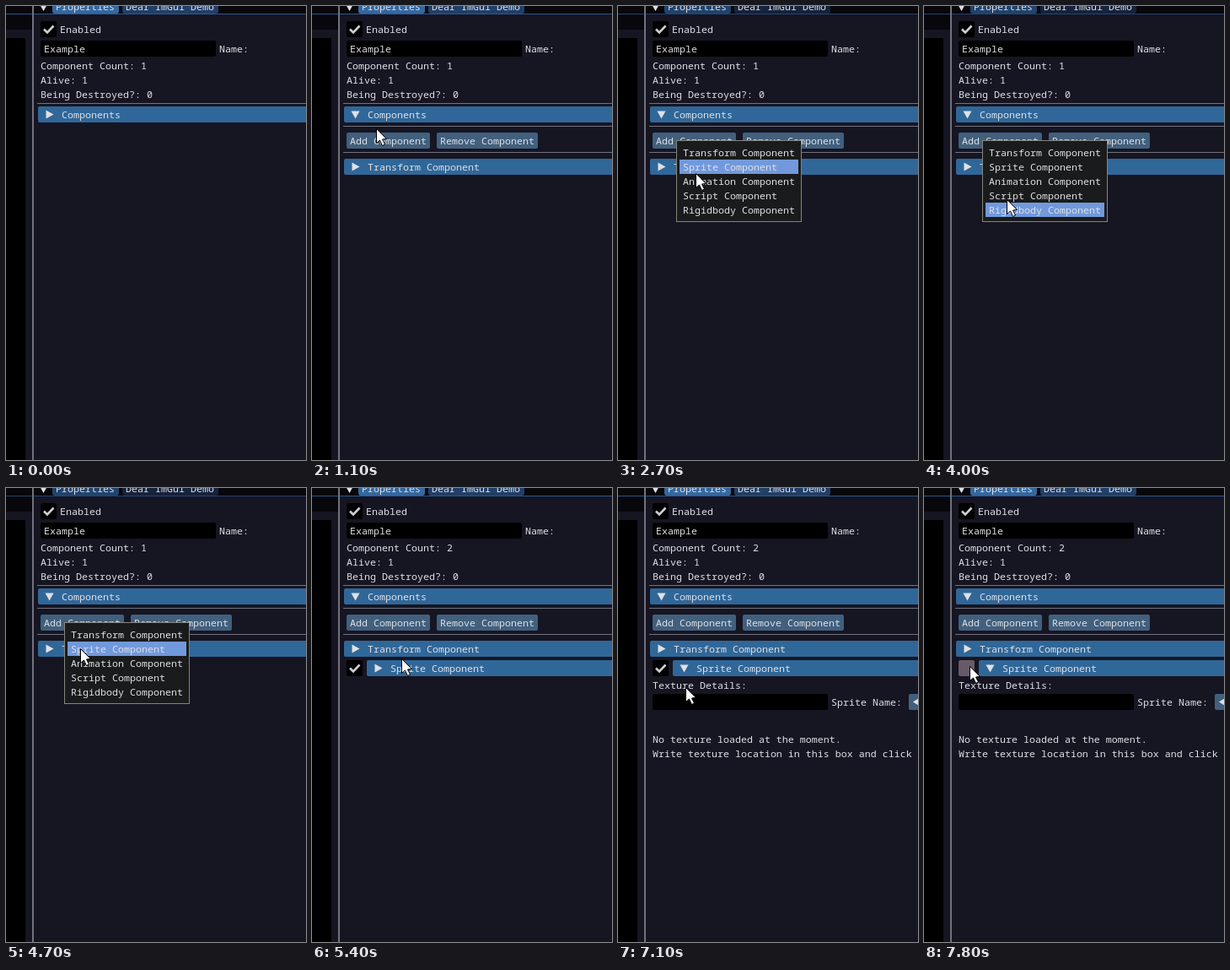
These frames come from a looping animation (356x538 px, 8 s). An HTML page with a canvas:

```html
<!DOCTYPE html>
<html>
<head>
<meta charset="utf-8">
<style>
html, body { margin: 0; width: 100%; height: 100%; overflow: hidden; background: #161522; }
canvas { display: block; }
</style>
</head>
<body>
<canvas id="stage" width="356" height="538"></canvas>
<script>
const ctx = document.getElementById('stage').getContext('2d');
const LOOP = 8000, STEP = 100;
const BG = '#161522', TEXT = '#e0e0e4', HEADER = '#306799', HEADER_HOT = '#4282bd',
      BUTTON = '#41607e', BUTTON_HOT = '#5680b4', LINE = '#72717d', BAR = '#07070c';
const ROW = 17, FRAME = 19, LEFT = 41;
const MENU = ['Transform', 'Sprite', 'Animation', 'Script', 'Rigidbody'];
const OPEN = 1000, MENU_IN = 1600, ADD = 5000, EXPAND = 5900, UNCHECK = 7700;

// Where the pointer comes to rest: time, x, y
const STOPS = [
  [400, -20, 8], [900, 86, 129], [1500, 68, 158], [2200, 68, 158],
  [2700, 92, 198], [3900, 100, 238], [4900, 88, 188], [5400, 106, 202],
  [5900, 88, 213], [6300, 97, 241], [6800, 108, 262], [7800, 54, 211]
];

function pointer(t) {
  t = Math.min(Math.max(t, STOPS[0][0]), STOPS.at(-1)[0]);
  const i = Math.max(1, STOPS.findIndex(s => s[0] >= t));
  const [t0, x0, y0] = STOPS[i - 1], [t1, x1, y1] = STOPS[i];
  const k = (t - t0) / (t1 - t0), ease = k * (2 - k);
  return [Math.round(x0 + (x1 - x0) * ease), Math.round(y0 + (y1 - y0) * ease)];
}

function box(x, y, w, h, color, r = 0) {
  ctx.fillStyle = color;
  ctx.beginPath();
  ctx.roundRect(x, y, w, h, r);
  ctx.fill();
}

function poly(points, color) {
  ctx.fillStyle = color;
  ctx.beginPath();
  points.forEach(([x, y]) => ctx.lineTo(x, y));
  ctx.closePath();
  ctx.fill();
}

// y is the baseline
function label(s, x, y) {
  ctx.fillStyle = TEXT;
  ctx.fillText(s, x, y);
}

function arrow(x, y, open) {
  poly(open ? [[x - 5, y - 4], [x + 5, y - 4], [x, y + 5]]
            : [[x - 4, y - 5], [x + 5, y], [x - 4, y + 5]], TEXT);
}

// Widgets are placed by their top edge
function header(s, x, y, open, hot) {
  box(x, y, 330, FRAME, hot ? HEADER_HOT : HEADER, 2);
  arrow(x + 13.5, y + 9.5, open);
  label(s, x + 28, y + 14);
}

function button(s, x, y, w, hot) {
  box(x, y, w, FRAME, hot ? BUTTON_HOT : BUTTON, 2);
  label(s, x + 4, y + 14);
}

function field(s, y, name) {
  box(LEFT, y, 208, FRAME, '#000', 2);
  label(s, LEFT + 4, y + 14);
  label(name, 253, y + 14);
}

function check(y, on, hot) {
  box(LEFT, y, FRAME, FRAME, hot ? '#685b69' : '#000', 2);
  if (!on) return;
  ctx.strokeStyle = '#d0d0d2';
  ctx.lineWidth = 2.6;
  ctx.beginPath();
  ctx.moveTo(LEFT + 4, y + 9.5);
  ctx.lineTo(LEFT + 8, y + 13.5);
  ctx.lineTo(LEFT + 15.5, y + 5.5);
  ctx.stroke();
}

function rule(y) { box(37, y, 319, 1, LINE); }

function tab(s, x, w, color) {
  box(x, -8, w, 17, color, 3);
  label(s, x + 4, 5);
}

function backdrop(focused) {
  box(0, 0, 356, 538, BG);
  box(0, 0, 356, 9, BAR);
  box(0, 9, 356, 1, focused ? '#2d568b' : '#20446d');
  box(0, 10, 31, 18, BAR);
  box(0, 38, 23, 500, '#000');
  box(31, 0, 2, 538, LINE);
  arrow(44.5, 1, true);
  tab('Properties', 55, 79, focused ? '#3468a0' : '#20446d');
  tab('Dear ImGui Demo', 138, 114, focused ? '#213f68' : '#15233d');
}

function popup(mx, my) {
  box(69, 159, 149, 97, '#85857d');
  box(70, 160, 147, 95, '#1a1b1c');
  MENU.forEach((name, i) => {
    const y = 165 + ROW * i;
    if (mx >= 73 && my >= y && my < y + ROW) box(73, y, 141, ROW, '#7199dc');
    label(name + ' Component', 77, y + 13);
  });
}

function cursor(x, y) {
  const shape = [[0, 0], [0, 17], [4, 13.5], [7, 20], [10, 18.5], [7, 12.5], [12, 12]];
  poly(shape.map(([dx, dy]) => [x + dx + 0.5, y + dy + 0.5]), '#fff');
  ctx.strokeStyle = '#000';
  ctx.lineWidth = 1;
  ctx.stroke();
}

function draw(t) {
  const menu = t >= MENU_IN && t < ADD, added = t >= ADD, expanded = t >= EXPAND;
  const [mx, my] = pointer(t - STEP);   // widgets react one step late
  const over = (x, y, w) => !menu && mx >= x && mx < x + w && my >= y && my < y + FRAME;

  backdrop(!menu);
  check(18, true);
  label('Enabled', 64, 32);
  field('Example', 41, 'Name:');
  ['Component Count: ' + (added ? 2 : 1), 'Alive: 1', 'Being Destroyed?: 0']
    .forEach((s, i) => label(s, LEFT, 75 + ROW * i));
  rule(115);
  header('Components', 38, 119, t >= OPEN, over(38, 119, 330));

  if (t >= OPEN) {
    rule(142);
    button('Add Component', LEFT, 150, 99, over(LEFT, 150, 99));
    button('Remove Component', 148, 150, 120, over(148, 150, 120));
    rule(173);
    header('Transform Component', 38, 181, false, over(38, 181, 330));
  }
  if (added) {
    check(204, t < UNCHECK, over(LEFT, 204, FRAME));
    header('Sprite Component', 65, 204, expanded, over(65, 204, 330));
  }
  if (expanded) {
    label('Texture Details:', LEFT, 238);
    field('', 244, 'Sprite Name:');
    box(345, 244, FRAME, FRAME, BUTTON, 2);
    poly([[350, 253.5], [359, 248], [359, 259]], TEXT);
    label('No texture loaded at the moment.', LEFT, 302);
    label('Write texture location in this box and click', LEFT, 302 + ROW);
  }
  if (menu) popup(mx, my);
  cursor(...pointer(t));
}

ctx.font = '11.667px "Noto Sans Mono", monospace';

function tick() {
  const t = performance.now() % LOOP;
  draw(Math.floor(t / STEP) * STEP);
  requestAnimationFrame(tick);
}
tick();
</script>
</body>
</html>
```
